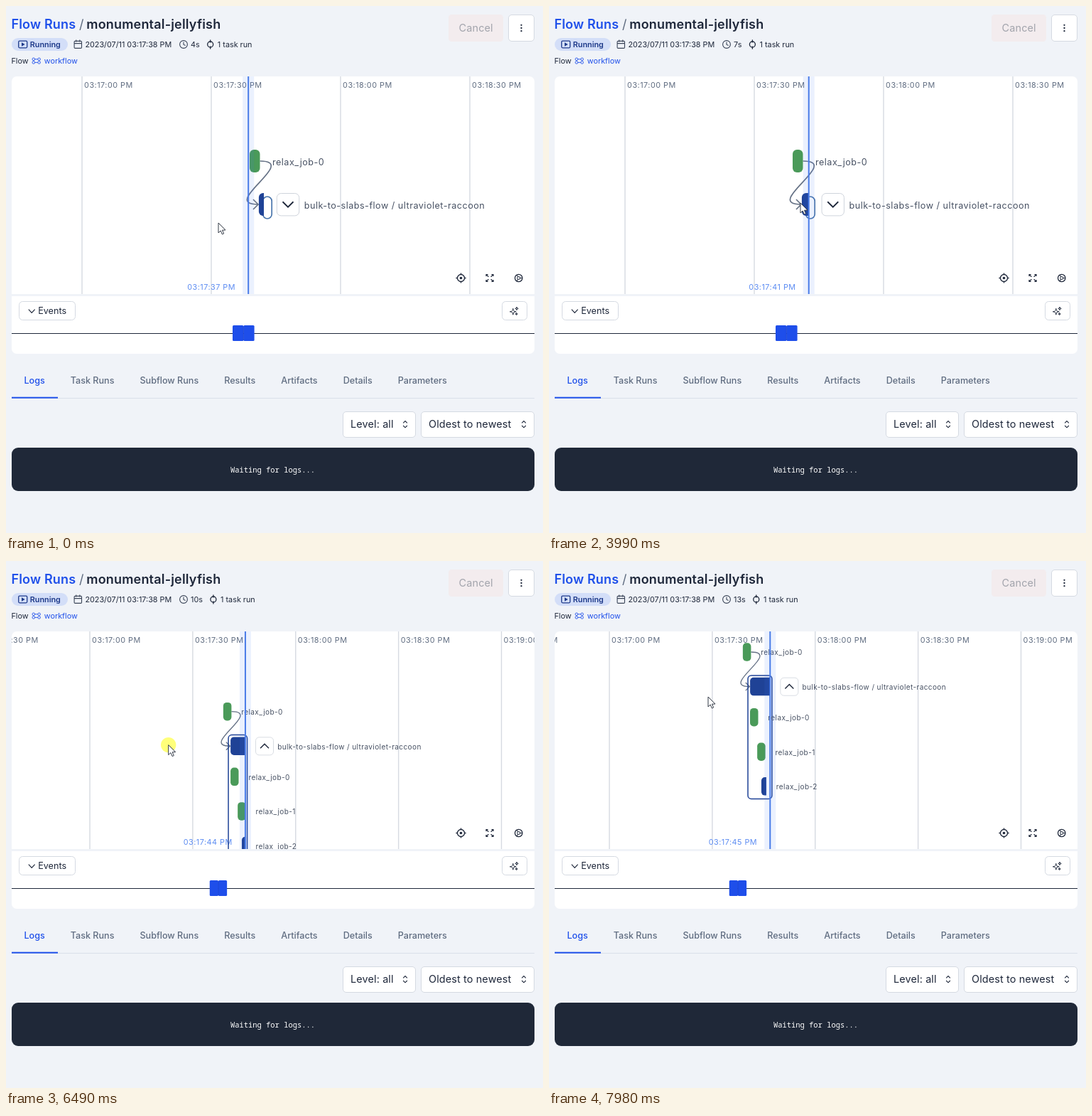
Animation of 756x741 px, one loop 8 s. Source, as an HTML page with a canvas:

```html
<!DOCTYPE html>
<html lang="en">
<head>
<meta charset="utf-8">
<title>Flow run timeline</title>
<style>
html, body { margin: 0; width: 100%; height: 100%; overflow: hidden; background: #f0f3f8; }
canvas { display: block; }
</style>
</head>
<body>
<canvas id="stage" width="756" height="741"></canvas>
<script>
const ctx = document.getElementById('stage').getContext('2d');
const LOOP = 8000;
const BG = '#f0f3f8', INK = '#1e273a', MUTED = '#5f6c80', BLUE = '#1f50ea';
const NAVY = '#1f4296', GREEN = '#4a9a59', BORDER = '#d5dae2';
const TRACK = .5;                 // letter spacing inside the graph
const HALF_MINUTE = 182;          // width of one grid cell at zoom 1
const OPEN_AT = 4900;             // the subflow unfolds
const GRAB_AT = 6320, DRAG = 940;

const clamp = u => Math.max(0, Math.min(1, u));
const span = (t, start, length) => clamp((t - start) / length);
const smooth = u => u * u * (3 - 2 * u);
const easeOut = u => 1 - (1 - u) ** 2;

function text(s, x, y, size, color, weight = 400, spacing = size > 14 ? size * .01 : 0) {
  ctx.font = `${weight} ${size}px Inter, sans-serif`;
  ctx.letterSpacing = spacing + 'px';
  ctx.fillStyle = color;
  ctx.fillText(s, x, y);
  return ctx.measureText(s).width;
}

function box(x, y, w, h, r, fill, stroke, lw = 1) {
  ctx.beginPath();
  ctx.roundRect(x, y, w, h, r);
  if (fill) { ctx.fillStyle = fill; ctx.fill(); }
  if (stroke) { ctx.strokeStyle = stroke; ctx.lineWidth = lw; ctx.stroke(); }
}

function trace(x, y, ...steps) {
  ctx.moveTo(x, y);
  for (let i = 0; i < steps.length; i += 2) ctx.lineTo(x += steps[i], y += steps[i + 1]);
}

// each run is a start point followed by relative steps
function line(color, lw, ...runs) {
  ctx.strokeStyle = color;
  ctx.lineWidth = lw;
  ctx.beginPath();
  for (const r of runs) trace(...r);
  ctx.stroke();
}

function ring(x, y, r, color, lw) {
  ctx.strokeStyle = color;
  ctx.lineWidth = lw;
  ctx.beginPath();
  ctx.arc(x, y, r, 0, 7);
  ctx.stroke();
}

function dot(x, y, r, color) {
  ctx.fillStyle = color;
  ctx.beginPath();
  ctx.arc(x, y, r, 0, 7);
  ctx.fill();
}

function chevron(x, y, w, h, color, lw) {
  line(color, lw, [x - w, y - h / 2, w, h, w, -h]);
}

function spokes(x, y, from, to, count, turn, color, lw) {
  for (let i = 0; i < count; i++) {
    const a = turn + i * 2 * Math.PI / count, dx = Math.cos(a), dy = Math.sin(a);
    line(color, lw, [x + from * dx, y + from * dy, (to - from) * dx, (to - from) * dy]);
  }
}

function sparkle(x, y, r) {
  ctx.beginPath();
  ctx.moveTo(x, y - r);
  for (const [dx, dy] of [[r, 0], [0, r], [-r, 0], [0, -r]]) ctx.quadraticCurveTo(x, y, x + dx, y + dy);
  ctx.strokeStyle = INK;
  ctx.lineWidth = 1;
  ctx.stroke();
}

function clock(sec) {
  const s = 3 * 3600 + 17 * 60 + sec;
  const two = v => String(v).padStart(2, '0');
  return `${two(Math.floor(s / 3600))}:${two(Math.floor(s / 60) % 60)}:${two(s % 60)} PM`;
}

function header(t) {
  text('Flow Runs', 7.4, 32, 18, BLUE, 600);
  text('/', 103, 32, 18, MUTED);
  text('monumental-jellyfish', 113.3, 32, 18, INK, 600);

  box(8, 45, 79, 18, 9, '#d3def8');
  box(17.7, 49.2, 12, 9.6, 1.5, null, '#1e3a8a', 1.3);
  ctx.fillStyle = '#1e3a8a';
  ctx.beginPath();
  trace(22, 51.3, 4.6, 2.7, -4.6, 2.7);
  ctx.fill();
  text('Running', 33.8, 58, 10.8, '#1e3a8a', 600);

  box(96.1, 49.4, 10.4, 10, 1.2, null, '#3b4558', 1.1);
  line('#3b4558', 1.1, [96, 52.6, 10.6, 0], [98.8, 47.6, 0, 2.8], [103.8, 47.6, 0, 2.8]);
  text('2023/07/11 03:17:38 PM', 111.4, 58, 10.8, INK);

  ring(250, 54, 5.4, '#3b4558', 1.1);
  line('#3b4558', 1.1, [250, 50.8, 0, 3.4, 2.6, 1.2]);
  const seconds = 4 + 3 * Math.floor((t + 1700) / 3000);
  const x = 275 + text(seconds + 's', 260, 58, 10.8, INK);
  ring(x, 54, 4, INK, 1.3);
  spokes(x, 54, 2.6, 6.6, 2, Math.PI / 2, INK, 1.3);
  text('1 task run', x + 10.2, 58, 10.8, INK);

  text('Flow', 7.4, 81, 10.8, INK);
  for (const y of [74.8, 79.4]) {
    ring(38.8, y, 1.8, BLUE, .9);
    ring(46.6, y, 1.8, BLUE, .9);
    line(BLUE, .9, [40.6, y, 4.2, 0]);
  }
  text('workflow', 53.8, 81, 10.8, BLUE);

  box(623, 12, 77, 38, 4.5, '#f3ecee');
  text('Cancel', 637.6, 36.2, 14.4, '#a2a4ac');
  box(707.5, 12.5, 36, 37, 4.5, '#fff', BORDER);
  for (const d of [-4.2, 0, 4.2]) dot(725.5, 31 + d, 1.15, INK);
}

function panels(k, tx) {
  box(8, 99, 736, 306, [7, 7, 0, 0], '#fff');
  box(8, 408, 736, 81, [0, 0, 7, 7], '#fff');
  box(18.5, 415.5, 79, 26, 5, '#fff', BORDER);
  chevron(36.2, 429, 4.4, 4.6, INK, 1.2);
  text('Events', 45.2, 433, 12.6, INK);
  box(698.5, 415.5, 35, 26, 5, '#fff', BORDER);
  sparkle(713.8, 429.8, 4.4);
  sparkle(719, 425.4, 2.2);
  sparkle(718.6, 433, 1.6);
  line(INK, 1.2, [8, 460.5, 736, 0]);
  const x = tx + 212 * k, w = 15.3 * k;
  for (const i of [0, 1]) box(x + i * w, 449, w, 22, 1.5, '#1e4eea');
  line('#1a43cf', .8, [x + w, 450, 0, 20]);
}

function lower() {
  const tabs = ['Logs', 'Task Runs', 'Subflow Runs', 'Results', 'Artifacts', 'Details', 'Parameters'];
  line('#dae0e9', 1, [8, 551.5, 736, 0]);
  let x = 25.4;
  tabs.forEach((s, i) => { x += 36 + text(s, x, 530.6, 12.6, i ? MUTED : BLUE, 500); });
  ctx.fillStyle = BLUE;
  ctx.fillRect(8, 549.7, 65, 2);
  for (const [s, left, w] of [['Level: all', 474, 103], ['Oldest to newest', 584, 160]]) {
    box(left + .5, 570.5, w - 1, 36, 4.5, '#fff', BORDER);
    text(s, left + 11, 593.2, 14.4, INK);
    for (const d of [-1, 1]) chevron(left + w - 15, 588.2 + 3.2 * d, 2.8, 2.8 * d, INK, 1.1);
  }
  box(8, 621, 736, 61, 9, '#1f2838');
  ctx.font = '10.45px "Noto Sans Mono", monospace';
  ctx.letterSpacing = '0px';
  ctx.fillStyle = '#fff';
  ctx.fillText('Waiting for logs...', 316, 655.6);
}

function label(s, x, y) {
  text(s, x, y + 5.5, 12.6, '#475163', 400, TRACK);
}

function task(name, start, end, y, running) {
  box(start, y - 16, end - start, 32, running ? [6, 0, 0, 6] : 6, running ? NAVY : GREEN);
  label(name, end + 17.4, y);
}

function nodes(t, now) {
  const grow = span(t, OPEN_AT, 200);
  const end = Math.max(256, now);

  ctx.strokeStyle = '#667286';
  ctx.lineWidth = 1.7;
  ctx.beginPath();
  ctx.moveTo(250.5, 0);
  ctx.bezierCurveTo(306, 0, 193, 61, 248, 61);
  trace(241, 54, 7, 7, -7, 7);
  ctx.stroke();
  task('relax_job-0', 236, 250.5, 0);

  if (grow < 1) {
    ctx.globalAlpha = 1 - grow;
    box(254.6, 50, 12.6, 31, 6.3, '#fff', '#4a76ac', 1.7);
  }
  if (grow > 0) {
    ctx.globalAlpha = grow;
    box(245, 41.4, now + 3.3 - 245, 40 + 178 * grow, 6, null, NAVY, 1.9);
    task('relax_job-0', 248.8, 263.2, 115.2);
    task('relax_job-1', 261.5, 275.9, 176.2);
    if (now > 268.8) task('relax_job-2', 268.8, Math.max(275.8, now - 6.7), 237.2, true);
  }
  ctx.globalAlpha = 1;
  box(248.9, 45, end - 248.9, 32, [6, 0, 0, 6], NAVY);
  box(end + 18.3, 45.5, 31.4, 31.4, 6, '#fff', '#cfd4dc', 1);
  chevron(end + 34, 61, 7.5, grow ? -7.5 : 7.5, INK, 1.8);
  label('bulk-to-slabs-flow / ultraviolet-raccoon', end + 56.8, 61);
}

function controls() {
  const y = 382.5;
  ring(640.5, y, 5, INK, 1.3);
  dot(640.5, y, 1.8, INK);
  spokes(640.5, y, 4.5, 7.1, 4, 0, INK, 1.3);
  for (const a of [-1, 1]) for (const b of [-1, 1]) {
    line(INK, 1.2, [681 + 2.4 * a, y + 5 * b, 2.6 * a, 0, 0, -2.6 * b], [681 + 1.6 * a, y + 1.6 * b, 3.4 * a, 3.4 * b]);
  }
  ring(721.7, y, 5.2, INK, 1.3);
  ring(721.7, y, 2, INK, 1);
  spokes(721.7, y, 2, 5, 3, 0, INK, 1.1);
}

function graph(t, { k, tx, ty }) {
  // the clock ticks in steps while the view rests
  const step = (t - 60) / 146.4;
  const now = 235.1 + .909 * (t < 5000 ? Math.floor(step) : step);
  const nowX = tx + now * k;

  ctx.save();
  ctx.beginPath();
  ctx.roundRect(8, 99, 736, 306, [7, 7, 0, 0]);
  ctx.clip();
  for (let n = -2; n < 7; n++) {
    const x = tx + n * HALF_MINUTE * k;
    line('#d6dae1', 1.4, [x, 99, 0, 306]);
    text(clock(n * 30), x + 3.1, 115, 10.8, MUTED, 400, TRACK);
  }
  ctx.textAlign = 'right';
  text(clock(Math.floor(now / HALF_MINUTE * 30 - 1.03)), nowX - 18.2, 398.8, 10.8, '#5c8cf2', 400, TRACK);
  ctx.textAlign = 'left';

  ctx.save();
  ctx.translate(tx, ty);
  ctx.scale(k, k);
  nodes(t, now);
  ctx.restore();

  ctx.fillStyle = 'rgba(60,115,240,.1)';
  ctx.fillRect(nowX - 8, 99, 16, 306);
  ctx.fillStyle = '#4a7ce8';
  ctx.fillRect(nowX - 1, 99, 2, 306);
  controls();
  ctx.restore();
}

// zoom out around the pointer, then drag up and to the left
function view(t) {
  const zoom = smooth(span(t, 5250, 640));
  return {
    k: 1 - .204 * zoom,
    tx: 107 + 17 * zoom - 39 * span(t, GRAB_AT + 10, 1050),
    ty: 218 + 15 * zoom - 105 * easeOut(span(t, GRAB_AT + 70, DRAG))
  };
}

function pointer(t) {
  // start, length, shift
  const moves = [[0, 650, 25, -13], [3430, 570, 30, -15], [4000, 500, 50, 6], [5050, 450, -173, 15]];
  const drag = easeOut(span(t, GRAB_AT, DRAG));
  let x = 299 - 7 * drag, y = 305 - 6 * drag - 95 * drag;
  for (const [start, length, dx, dy] of moves) {
    const u = smooth(span(t, start, length));
    x += dx * u;
    y += dy * u;
  }
  y -= 6 * smooth(span(t, 5050, 450));
  if (drag > 0 && drag < 1) dot(x, y, 10.7, 'rgba(255,255,40,.62)');
  ctx.beginPath();
  trace(x, y, 0, 14, 3.2, -3, 2.2, 5, 2.2, -1, -2.1, -4.8, 4.5, -.2);
  ctx.closePath();
  ctx.fillStyle = '#fff';
  ctx.fill();
  ctx.strokeStyle = '#333a46';
  ctx.lineWidth = 1;
  ctx.stroke();
}

function frame() {
  const t = performance.now() % LOOP;
  const v = view(t);
  ctx.fillStyle = BG;
  ctx.fillRect(0, 0, 756, 741);
  header(t);
  panels(v.k, v.tx);
  lower();
  graph(t, v);
  pointer(t);
  requestAnimationFrame(frame);
}
frame();
</script>
</body>
</html>
```
